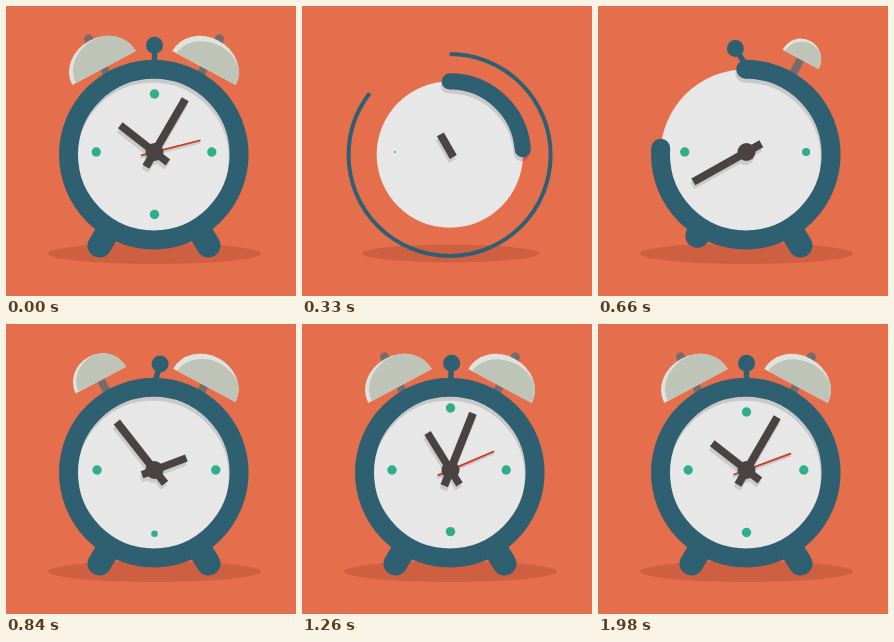
An HTML page with a canvas for the animation above (2580 ms loop, 290 by 290 pixels).

```html
<!DOCTYPE html>
<html>
<head>
<meta charset="utf-8">
<style>
html, body { margin: 0; width: 100%; height: 100%; overflow: hidden; background: #e56f4d; }
canvas { display: block; width: 290px; height: 290px; }
</style>
</head>
<body>
<canvas id="c"></canvas>
<script>
const LOOP = 2580, STEP = 30, REST = 1980;
const BLUE = '#2f6072', DARK = '#4a4243', GREEN = '#2fae8e', METAL = '#776c6a';
const SHADE = 'rgba(0,0,0,.13)', HAND_SHADE = '#cbcbca';
const CX = 147.8, CY = 148.6, PX = 148.5, PY = 146;
const TAU = Math.PI * 2;
const canvas = document.getElementById('c');
const ratio = window.devicePixelRatio || 1;
canvas.width = canvas.height = 290 * ratio;
const g = canvas.getContext('2d');

const rad = d => d * Math.PI / 180;
const span = (t, a, b) => Math.max(0, Math.min(1, (t - a) / (b - a)));
const sine = p => (1 - Math.cos(Math.PI * p)) / 2;
const out = p => 1 - (1 - p) ** 3;
const back = p => 1 + 2.7 * (p - 1) ** 3 + 1.7 * (p - 1) ** 2;
// Turn still to go, in degrees, for a hand that passes halfway at mid
const turnLeft = (t, total, mid) => total / (1 + Math.exp((t - mid) / 197));
const wobble = age => 5.5 * Math.max(0, 1 - age / 960) * Math.sin(TAU * age / 820);

function disc(x, y, rx, color, ry = rx) {
  if (rx <= 0) return;
  g.fillStyle = color;
  g.beginPath();
  g.ellipse(x, y, rx, ry, 0, 0, TAU);
  g.fill();
}

function line(x1, y1, x2, y2, w, color, cap = 'butt') {
  g.strokeStyle = color;
  g.lineWidth = w;
  g.lineCap = cap;
  g.beginPath();
  g.moveTo(x1, y1);
  g.lineTo(x2, y2);
  g.stroke();
}

function arc(x, y, r, deg, w, color, cap) {
  if (deg <= 0 || r <= 0 || w <= 0) return;
  g.strokeStyle = color;
  g.lineWidth = w;
  g.lineCap = cap;
  g.beginPath();
  g.arc(x, y, r, -Math.PI / 2, rad(deg - 90));
  g.stroke();
}

function hand(angle, len, tail, w, color, dx = 0, dy = 0) {
  if (len <= 0) return;
  const s = Math.sin(rad(angle)), c = Math.cos(rad(angle));
  const x = PX + dx, y = PY + dy;
  line(x - s * tail, y + c * tail, x + s * len, y - c * len, w, color);
}

function bell(side, t, start) {
  const size = out(span(t, start, start + 370));
  if (size <= 0) return;
  const lift = 40 * size * (1 - size);
  const rx = 36 * size, ry = 31 * size ** .7;
  const nub = span(t, start + 230, start + 530);
  g.save();
  g.translate(148 + side * 50, 62);
  g.rotate(rad(28 * side));
  line(0, 16, 0, -lift, 8, METAL);
  if (nub > 0) line(0, -20, 0, -20 - 13 * back(nub), 9, METAL, 'round');
  g.translate(0, -lift);
  g.beginPath();
  g.ellipse(0, 0, rx, ry, 0, Math.PI, TAU);
  g.closePath();
  g.fillStyle = '#e0e2dc';
  g.fill();
  g.clip();
  disc(4 * size, side < 0 ? 1 : 4 * size, rx, '#bfc4b9', ry);
  g.restore();
}

function foot(side, t, start) {
  const p = out(span(t, start, start + 180));
  if (p > 0) line(148 + side * 42, 219, 148 + side * (42 + 12.5 * p), 219 + 20.5 * p, 24, BLUE, 'round');
}

function knob(t) {
  const p = span(t, 430, 630);
  if (p <= 0) return;
  const swing = -32 * Math.exp((660 - t) / 260) * Math.cos(TAU * (t - 660) / 390);
  const a = rad(Math.max(-35, Math.min(25, swing)));
  const len = 21 * back(p);
  const x = PX + Math.sin(a) * len, y = 60.3 - Math.cos(a) * len;
  line(PX, 60.3, x, y, 5.5, BLUE);
  disc(x, y, 8.5 * p, BLUE);
}

function dots(t) {
  const spots = [[-58.3, 0], [57.3, 0], [0, 62.5], [0, -58]];
  spots.forEach(([x, y], i) => {
    const start = 290 + 210 * i;
    const k = 1 + wobble(t - start - 100) / Math.hypot(x, y);
    disc(PX + x * k, PY + y * k, 4.7 * span(t, start, start + 185), GREEN);
  });
}

function hands(t, second) {
  const mGrow = span(t, 270, 450);
  const hGrow = out(span(t, 720, 1020));
  const sGrow = sine(span(t, 930, 1140));
  const minute = 390.5 - turnLeft(t, 720, 396.7);
  const hour = -52.5 + turnLeft(t, 360, 708);
  const hub = 9 * out(span(t, 345, 500));
  const pair = (color, dx, dy) => {
    hand(hour, 43.5 * hGrow, 17 * hGrow, 7.5, color, dx, dy);
    hand(minute, 61 * mGrow, 17 * mGrow, 8, color, dx, dy);
    disc(PX + dx, PY + dy, hub, color);
  };
  pair(HAND_SHADE, -1, 4);
  hand(second, 47.5 * sGrow, 14 * sGrow, 1.5, SHADE, -.5, 2.5);
  hand(second, 47.5 * sGrow, 14 * sGrow, 2, '#c8402a');
  pair(DARK, 0, 0);
}

function draw(ms) {
  const first = ms < STEP;
  const t = first ? REST : Math.min(REST, ms);
  const scale = sine(span(t, 30, 428));
  const R = 85.3 * scale, w = 19 * scale;
  const sweep = 360 * span(t, 180, 810);

  g.setTransform(ratio, 0, 0, ratio, 0, 0);
  g.fillStyle = '#e56f4d';
  g.fillRect(0, 0, 290, 290);
  disc(148.5, 247.5, 106.5 * scale ** 1.2, '#ce5f41', 10.5 * scale);

  if (t < 540) {
    const r = Math.min(112, 79.9 + t * .064);
    arc(147.6, 149, r, 360 * span(t, 30, 381), Math.min(6, 9.5 - t / 60), BLUE, 'butt');
  }

  bell(1, t, 570);
  bell(-1, t, 690);
  knob(t);
  foot(1, t, 465);
  foot(-1, t, 620);

  disc(CX, CY, R, '#e7e7e7');
  g.save();
  g.beginPath();
  g.arc(CX, CY, R + 6, 0, TAU);
  g.clip();
  arc(CX - 1, CY + 4, R, sweep, w, SHADE, 'round');
  g.restore();
  arc(CX, CY, R, sweep, w, BLUE, 'round');

  dots(t);
  // The second hand ticks back as the loop restarts
  hands(t, first ? 75.8 : 61.5 + 8.2 * sine(span(t, 1050, 1400)));
}

const start = performance.now();
function tick() {
  const ms = (performance.now() - start) % LOOP;
  draw(Math.floor(ms / STEP) * STEP);
  requestAnimationFrame(tick);
}
tick();
</script>
</body>
</html>
```
